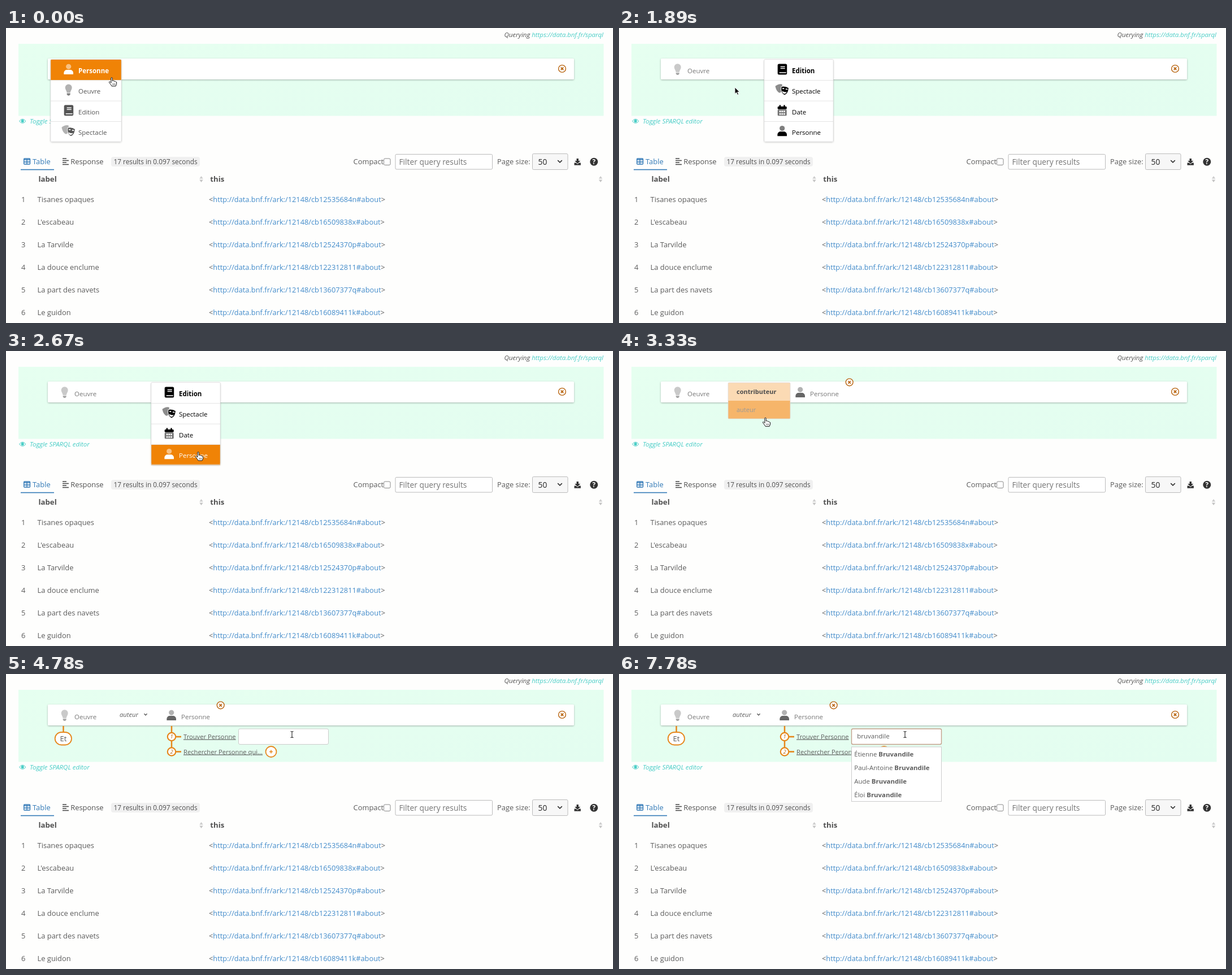
An HTML page that plays this animation: 1074x522 px, repeating every 8 s.

```html
<!DOCTYPE html>
<html lang="fr">
<head>
<meta charset="utf-8">
<title>Query builder</title>
<style>
html, body { margin: 0; width: 100%; height: 100%; overflow: hidden; background: #fefefd; }
svg { display: block; font-family: "Open Sans", "Noto Sans", sans-serif; }
</style>
</head>
<body>
<svg id="stage" width="1074" height="522" viewBox="0 0 1074 522">
  <defs>
    <filter id="shadow" x="-5%" y="-30%" width="110%" height="170%">
      <feDropShadow dx="0" dy="1" stdDeviation="1.6" flood-color="#000" flood-opacity=".3"/>
    </filter>
    <linearGradient id="mint" x2="1" y2="1">
      <stop offset="0" stop-color="#e6fff0"/><stop offset="1" stop-color="#e3fdf0"/>
    </linearGradient>
  </defs>
  <g id="page"></g>
  <g id="live"></g>
</svg>
<script>
const page = document.getElementById('page'), live = document.getElementById('live');
const ORANGE = [240, 131, 6], WHITE = [255, 255, 255], BLACK = [0, 0, 0];
const TEAL = '#48cdc6', RUST = '#b8640f', RING = '#e5871c';
const LOOP = 8000, TICK = 1000 / 9;

const rgb = c => `rgb(${c.map(Math.round)})`;
const mix = (a, b, k) => a.map((v, i) => v + (b[i] - v) * k);
const text = (x, y, s, size, fill = '#5c5c5c', more = '') =>
  `<text x="${x}" y="${y}" font-size="${size}" fill="${fill}" ${more}>${s}</text>`;
const rect = (x, y, w, h, fill, more = '') =>
  `<rect x="${x}" y="${y}" width="${w}" height="${h}" fill="${fill}" ${more}/>`;
const circle = (x, y, r, fill, more = '') =>
  `<circle cx="${x}" cy="${y}" r="${r}" fill="${fill}" ${more}/>`;
const path = (d, fill, more = '') => `<path d="${d}" fill="${fill}" ${more}/>`;
const line = (d, color, width = 1) => path(d, 'none', `stroke="${color}" stroke-width="${width}"`);
const move = (x, y, s, more = '') => `<g transform="translate(${x} ${y}) ${more}">${s}</g>`;
const BOLD = 'font-weight="700"', ITALIC = 'font-style="italic"', UNDER = 'text-decoration="underline"';

// Linear interpolation over [tick, value...] keys
function at(n, keys) {
  const i = keys.findIndex(k => k[0] > n);
  if (i < 0) return keys[keys.length - 1].slice(1);
  if (i === 0) return keys[0].slice(1);
  const a = keys[i - 1], b = keys[i];
  return mix(a.slice(1), b.slice(1), (n - a[0]) / (b[0] - a[0]));
}

const closeMark = (x, y) => circle(x, y, 6.4, '#fff', `stroke="${RUST}" stroke-width="1.4"`) +
  line(`M${x - 2.3} ${y - 2.3}l4.6 4.6m0-4.6l-4.6 4.6`, RUST, 1.7);
const chevron = (x, y, s, color) => line(`M${x - s} ${y - s / 2}l${s} ${s}l${s}-${s}`, color, 1.6);

// Two-tone icons centred on the origin: c is the ink, bg the cut-out colour
const icons = {
  user: c => circle(0, -4.7, 4.6, c, 'opacity=".5"') +
    path('M-8.3 9V6.5C-8.3 3-5.5 1-2.7 1H2.7C5.5 1 8.3 3 8.3 6.5V9Z', c),
  bulb: c => path('M-3 5.2C-3 2.5-6-.3-6-3.8a6 6 0 0 1 12 0C6-.3 3 2.5 3 5.2Z', c, 'opacity=".45"') +
    path('M-3 6.2H3V8L1.3 10H-1.3L-3 8Z', c, 'opacity=".75"'),
  book: (c, bg) => rect(-8, -9.5, 16.5, 19, c, 'rx="2.5"') +
    line('M-3-4.5H5M-3-1.5H5M-5 6H7', bg, 1.5),
  masks: (c, bg) => move(-5, -2.5, path('M-6.5-5Q0-9 6-6.5V1Q4 7-.5 8Q-6 6-6.5-5Z', c, 'opacity=".45"'), 'rotate(-10)') +
    move(4, 1, path('M-6.5-6Q0-9 7-5.5Q8 5 1 8.5Q-7 5-6.5-6Z', c, `stroke="${bg}"`) +
      line('M-4-2.5q1.5-1.5 3 0M2-2q1.5-1.5 3 0', bg, 1.6) +
      path('M-4 1.5Q0 4 4.5 2Q3 6 .5 6Q-3 5.5-4 1.5Z', bg), 'rotate(8)'),
  date: (c, bg) => rect(-8, -1.5, 16, 11, c, 'rx="1.5" opacity=".55"') +
    rect(-8, -7, 16, 5, c, 'rx="1.5"') + rect(-5, -9.5, 2.4, 4, c) + rect(2.6, -9.5, 2.4, 4, c) +
    [-5, -1.3, 2.4].map(x => rect(x, .5, 2.7, 2.7, bg) + rect(x, 5, 2.7, 2.7, bg)).join('')
};

function menu(x, w, items, dim) {
  const step = 36.4;
  let s = rect(x, 56, w, 145, '#fff', 'rx="2" filter="url(#shadow)"');
  items.forEach(([name, icon, h], i) => {
    const y = 56 + i * step, bg = rgb(mix(WHITE, ORANGE, h));
    const ink = rgb(mix(dim, WHITE, h));
    s += rect(x, y, w, step, bg) + (i ? line(`M${x} ${y + .3}h${w}`, '#e4e4e4') : '') +
      move(x + 31.7, y + 17, icons[icon](ink, bg)) +
      text(x + 49, y + 24, name, 11.5, ink, i ? '' : BOLD);
  });
  return s + rect(x - .2, 55.5, w + .4, 145.5, 'none', 'rx="2" stroke="#dcdcdc" stroke-width=".8"');
}

// k runs from open (0) to nearly closed (1): the list shrinks, rises and fades
function propertyMenu(k, hover) {
  const s = ['contributeur', 'auteur'].map((name, i) => {
    const h = hover[i];
    return rect(-55, i * 32, 110, 32, rgb(mix(WHITE, ORANGE, h))) +
      text(-40, 20 + i * 32, name, 11, rgb(mix(BLACK, WHITE, h)), i && !k ? '' : BOLD);
  }).join('') + rect(-55, 0, 110, 64, 'none', 'stroke="#ddd" stroke-width=".8" rx="2"');
  return `<g opacity="${1 - .7 * k}">` + move(248, 56 - 11 * k, s, `scale(${1 - .22 * k})`) + '</g>';
}

const pointers = {
  hand: path('M-1.2 .8C-1.2-.8 1.2-.8 1.2 .8V5.5l1-.4 1.6 .4 .8 .6 1.8 .4 .8 .8 1.4 .6v3.5l-1.5 3.5h-7l-1.5-2.5-3-4c-.8-1.4 .8-2 1.8-1l1.6 1.6Z',
      '#fff', 'stroke="#111" stroke-linejoin="round"') + line('M2 10v3M4 10v3M6 10v3', '#333', .7),
  arrow: path('M0 0V11.5l2.7-2.5 1.9 4.3 2-.9-1.9-4.1H8.3Z', '#111', 'stroke="#fff" stroke-width=".8"'),
  beam: line('M-2.5-5.5Q0-5.5 0-4Q0-5.5 2.5-5.5M0-4V4M-2.5 5.5Q0 5.5 0 4Q0 5.5 2.5 5.5', '#222', 1.1)
};
const cursorPath = [
  [0, 187, 88], [2, 191, 87], [4, 191, 87], [7, 177, 111], [9, 177, 111], [10, 175, 110], [16, 175, 110],
  [17, 205, 105], [18, 262, 88], [19, 338, 102], [20, 359, 125], [21, 358, 145], [22, 350, 166],
  [24, 340, 179], [27, 340, 179], [28, 315, 157], [29, 275, 130], [31, 243, 107], [32, 243, 107],
  [34, 241, 106], [37, 241, 106], [38, 262, 118], [39, 291, 129], [40, 291, 129], [41, 345, 128],
  [42, 455, 114], [43, 506, 107]];
function pointerKind(n) {
  if (n >= 42) return 'beam';
  return n < 13 || (n > 17 && n < 25) || (n > 29 && n < 37) ? 'hand' : 'arrow';
}

const typed = 'bruvandile', keyTicks = [54, 56, 57, 58, 60, 60, 62, 62, 63, 63];

function criteria(n) {
  const mark = (y, d) => line(`M293 ${y}H310`, RING, 2.6) +
    circle(293, y, 7.2, '#fff', `stroke="${RING}" stroke-width="2.2"`) +
    text(293, y + 3.4, d, 9.5, RUST, ITALIC + ' text-anchor="middle"');
  const focused = n >= 46;
  let s = line('M101.5 92V103M293 92V137', RING, 2.5) +
    rect(86.7, 103, 29.3, 22.5, '#fff', `rx="11.2" stroke="${RING}" stroke-width="1.8"`) +
    text(101.5, 119, 'Et', 13, '#5c5c5c', 'text-anchor="middle"') +
    mark(111, 1) + mark(137.5, 2) +
    text(314, 114.5, 'Trouver Personne', 11.2, '#5c5c5c', UNDER) +
    text(314, 141.5, 'Rechercher Personne qui...', 11.2, '#5c5c5c', UNDER) +
    circle(469, 137.5, 9.5, '#fff', `stroke="${RING}" stroke-width="1.8"`) +
    line('M466 137.5h6M469 134.5v6', RING, 1.5) +
    rect(411.5, 97, 159, 27.5, '#fff', `rx="2.5" stroke="${focused ? '#c4a08c' : '#ccc'}" stroke-width="${focused ? 1.4 : 1}"`);
  const word = typed.slice(0, keyTicks.filter(k => k <= n).length);
  s += text(421.3, 114.3, word, 11.5, '#5c5c5c', 'id="word"');
  if (focused && n < 65) s += rect(421.5, 103, 1, 15, '#333', 'id="caret"');
  if (n >= 70) {
    s += rect(411.5, 129, 159, 96.5, '#fff', 'stroke="#ccc"');
    ['Étienne', 'Paul-Antoine', 'Aude', 'Éloi'].forEach((first, i) => {
      s += text(416.3, 145.5 + 24 * i, `${first} <tspan ${BOLD}>Bruvandile</tspan>`, 11.4);
    });
  }
  return s;
}

function draw(n) {
  let s = '';
  const h = (...keys) => at(n, keys)[0];
  if (n < 13) {
    s += menu(79, 125, [
      ['Personne', 'user', h([5, 1], [6, .4], [7, 0])], ['Oeuvre', 'bulb', h([4, 0], [6, .6], [7, 1])],
      ['Edition', 'book', 0], ['Spectacle', 'masks', 0]
    ], at(n, [[0, 85, 85, 85], [2, 0, 0, 0]]));
  } else {
    s += move(103.7, 73, icons.bulb('#888')) + text(121, 80, 'Oeuvre', 11.5, '#777');
  }
  if (n >= 13 && n < 25) {
    s += menu(257, 122, [
      ['Edition', 'book', h([17, 0], [18, .6], [19, .7], [20, .1], [21, 0])],
      ['Spectacle', 'masks', h([18, 0], [19, .4], [20, .4], [21, .1], [22, 0])],
      ['Date', 'date', h([19, 0], [20, .4], [21, .8], [22, .5], [23, 0])],
      ['Personne', 'user', h([21, 0], [22, .5], [23, 1])]
    ], BLACK);
  }
  if (n >= 25) {
    const dx = n < 36 ? 28 : 0;
    s += move(dx, 0, move(292.7, 73, icons.user('#666')) +
      text(310, 80, 'Personne', 11.5, '#777') + closeMark(379.7, 55.3));
    if (n >= 36) s += text(201, 76, 'auteur', 11.2, '#5c5c5c', ITALIC) + chevron(247, 71.5, 2.6, '#666') + criteria(n);
    if (n < 38) s += propertyMenu(h([35, 0], [36, .4], [37, 1]),
      [h([28, 0], [29, .6], [30, .3], [31, 0], [35, 0], [37, .85]), h([29, 0], [30, .6], [31, 1])]);
  }
  live.innerHTML = s + move(...at(n, cursorPath), pointers[pointerKind(n)]);
  const caret = document.getElementById('caret');
  if (caret) caret.setAttribute('x', 421.5 + document.getElementById('word').getComputedTextLength());
}

function drawPage() {
  const dark = '#333', blue = '#337ab7', link = '#428bca';
  const sorter = x => path(`M${x - 3.2} 266.5h6.4l-3.2-4.5Z`, '#ccc') + path(`M${x - 3.2} 268.5h6.4l-3.2 4.5Z`, '#c4c4c4');
  const rows = [
    ['Tisanes opaques', '12535684n'], ["L'escabeau", '16509838x'], ['La Tarvilde', '12524370p'],
    ['La douce enclume', '122312811'], ['La part des navets', '13607377q'], ['Le guidon', '16089411k']];
  page.innerHTML =
    text(1057, 16, `Querying <tspan fill="${TEAL}">https://data.bnf.fr/sparql</tspan>`, 11.5, '#555', ITALIC + ' text-anchor="end"') +
    rect(22, 28, 1035.5, 127.5, 'url(#mint)') +
    rect(74, 54, 931, 37, '#fff', 'rx="2" filter="url(#shadow)"') + closeMark(984, 72) +
    path('M23.5 164.8Q29.2 157.5 35 164.8Q29.2 172 23.5 164.8Z', 'none', `stroke="${TEAL}"`) +
    circle(29.2, 164.6, 2.6, TEAL) + text(42, 168.5, 'Toggle SPARQL editor', 11.5, TEAL, ITALIC) +
    rect(31.7, 231, 10.8, 10, 'none', `rx="1" stroke="${blue}" stroke-width="1.4"`) +
    line('M31.5 233H43M31.5 237H43M37 232V241', blue, 1.4) +
    text(47, 241, 'Table', 12.9, blue) + rect(26, 249.8, 59, 1.6, blue) +
    line('M100 231H107M100 234.5H111M100 238H107M100 241.5H111', '#444', 1.5) +
    text(114.2, 241, 'Response', 12.9, '#505050') +
    rect(186, 228, 157, 17, '#f0f0f0', 'rx="4"') + text(190.5, 241, '17 results in 0.097 seconds', 11.8, '#505050') +
    text(614.5, 241, 'Compact', 12.9) + rect(668.5, 231, 11.5, 11.5, '#fff', 'rx="2" stroke="#888"') +
    rect(689, 223.5, 171.5, 26.5, '#fff', 'rx="2" stroke="#bbb"') + text(695.5, 241.5, 'Filter query results', 13.8, '#757575') +
    text(869, 241, 'Page size:', 12.9) +
    rect(931.5, 222.5, 62.5, 28, '#f7f7f7', 'rx="2" stroke="#bbb"') + text(941.5, 241.5, '50', 13.8, '#222') + chevron(980, 236, 3.8, dark) +
    path('M1009.5 231h3.5v4h3.2l-5 5-5-5h3.3Z', dark) + path('M1005.5 238.5h3l2.7 2.5 2.7-2.5h3V242.7h-11.4Z', dark) +
    circle(1040.3, 236.7, 7, dark) + text(1040.3, 241, '?', 11.5, '#fff', BOLD + ' text-anchor="middle"') +
    text(57.5, 272, 'label', 13.2, '#505050', BOLD) + text(361.3, 272, 'this', 13.2, '#505050', BOLD) +
    sorter(345.5) + sorter(1052) +
    rows.map(([label, id], i) => {
      const y = 308.2 + 40 * i;
      return text(27, y, i + 1, 12.9) + text(55.6, y, label, 12.9) +
        text(359, y, `&lt;<tspan fill="${link}">http://data.bnf.fr/ark:/12148/cb${id}#about</tspan>&gt;`, 12.8);
    }).join('');
}

drawPage();
const start = performance.now();
let shown = -1;
function frame(now) {
  const t = Math.max(0, now - start) % LOOP;
  const n = Math.min(71, Math.floor((t + 5) / TICK));
  if (n !== shown) draw(shown = n);
  requestAnimationFrame(frame);
}
draw(0);
requestAnimationFrame(frame);
</script>
</body>
</html>
```
